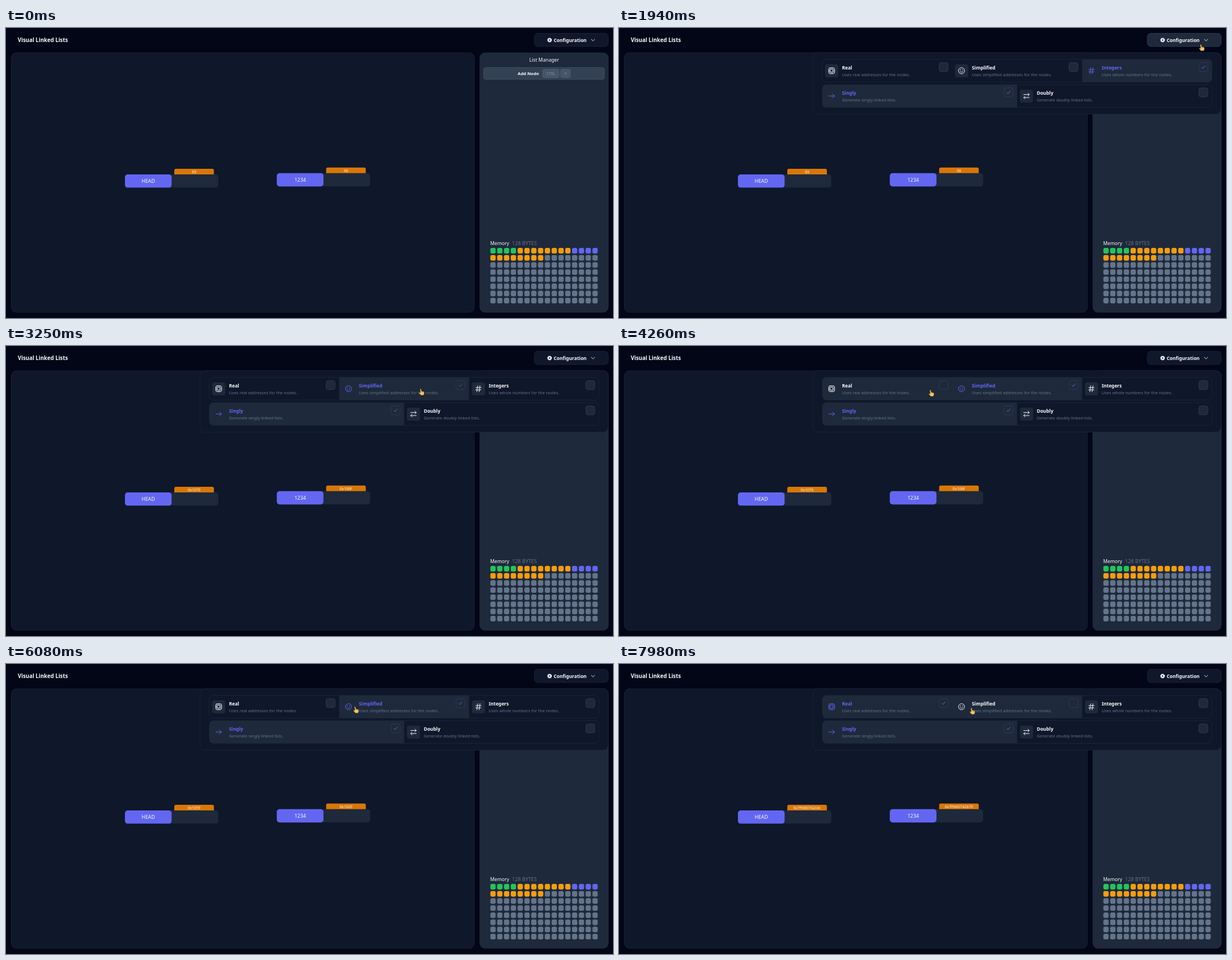
Recreate the animation shown at these times as an HTML page. Size 1082 px wide and 517 px high, loop 8000 ms.

```html
<!DOCTYPE html>
<html lang="en">
<head>
<meta charset="utf-8">
<title>Linked list visualiser</title>
<style>
  html, body { margin: 0; width: 100%; height: 100%; overflow: hidden; background: #020617; }
  svg { display: block; width: 1082px; height: 517px; font-family: "Noto Sans", "Open Sans", sans-serif; }
</style>
</head>
<body>
<svg viewBox="0 0 1082 517"><g id="base"></g><g id="live"></g></svg>
<script>
const LOOP = 8000;
const C = {
  panel: '#0f172a', raised: '#1e293b', line: '#334155', badge: '#475569', muted: '#64748b',
  indigo: '#6366f1', amber: '#f59e0b', tab: '#d97706', green: '#22c55e', white: '#f8fafc'
};

// Drawing helpers
const rect = (x, y, w, h, r, fill, stroke = 'none') =>
  `<rect x="${x}" y="${y}" width="${w}" height="${h}" rx="${r}" fill="${fill}" stroke="${stroke}" stroke-width=".8"/>`;
const text = (s, x, middle, size, fill, weight = 400, anchor = 'start') =>
  `<text x="${x}" y="${middle + size * 0.357}" font-size="${size}" fill="${fill}" font-weight="${weight}" text-anchor="${anchor}">${s}</text>`;
const stroke = (d, color, width = 1) =>
  `<path d="${d}" fill="none" stroke="${color}" stroke-width="${width}" stroke-linecap="round" stroke-linejoin="round"/>`;
const at = (x, y, body, opacity = 1) => `<g transform="translate(${x} ${y})" opacity="${opacity}">${body}</g>`;
const clamp = v => Math.max(0, Math.min(1, v));
const mix = (a, b, k) => '#' + [1, 3, 5].map(i => {
  const [p, q] = [a, b].map(c => parseInt(c.slice(i, i + 2), 16));
  return Math.round(p + (q - p) * k).toString(16).padStart(2, '0');
}).join('');

const icons = {
  chip: c => stroke('M-3.8 -4.8H3.8Q4.8 -4.8 4.8 -3.8V3.8Q4.8 4.8 3.8 4.8H-3.8Q-4.8 4.8 -4.8 3.8V-3.8Q-4.8 -4.8 -3.8 -4.8ZM-2.4 -2.4H2.4V2.4H-2.4Z', c) +
    stroke('M-2 -5.7v.9M0 -5.7v.9M2 -5.7v.9M-2 4.8v.9M0 4.8v.9M2 4.8v.9M-5.7 -2h.9M-5.7 0h.9M-5.7 2h.9M4.8 -2h.9M4.8 0h.9M4.8 2h.9', c, .7),
  smile: c => `<circle r="5.4" fill="none" stroke="${c}"/>` +
    stroke('M-2.6 1.2Q0 4.4 2.6 1.2', c) + stroke('M-1.9 -1.6v.1M1.9 -1.6v.1', c, 1.5),
  hash: c => stroke('M-4.6 -2H5M-5 2H4.6M-1.2 -5.4L-2.8 5.4M2.8 -5.4L1.2 5.4', c),
  arrow: c => stroke('M-5 0H5M1.4 -3.6L5 0L1.4 3.6', c),
  swap: c => stroke('M-5 -2.6H5M2.6 -5L5 -2.6L2.6 -.2M5 2.8H-5M-2.6 .4L-5 2.8L-2.6 5.2', c)
};

// Timeline
const states = [
  { from: 0, mode: 'int', addresses: ['69', '98'] },
  { from: 3060, mode: 'simple', addresses: ['0x1070', '0x106F'] },
  { from: 4430, mode: 'real', addresses: ['0x7ffd60742c14', '0x7ffd60742c04'] },
  { from: 5810, mode: 'simple', addresses: ['0x1059', '0x1020'] },
  { from: 6980, mode: 'real', addresses: ['0x7ffd60742c4c', '0x7ffd60742b70'] }
];
const stateAt = t => states.filter(s => s.from <= Math.max(t, 0)).pop();

// Pointer keys: time, x, y
const route = [
  [590, 1044, 500], [800, 1043, 315], [1000, 1048, 105], [1070, 1049, 77], [1340, 1047, 25],
  [1940, 1039, 35], [2210, 1022, 26], [2630, 741, 82], [3250, 741, 82], [4000, 559, 91],
  [4080, 558, 90], [4260, 557, 84], [5000, 557, 84], [5350, 623, 86], [5610, 642, 79],
  [5810, 642, 79], [6560, 582, 88], [6640, 579, 89], [7490, 579, 89], [7980, 630, 84]
];
function pointerAt(t) {
  if (t < route[0][0]) return { x: -99, y: -99 };
  const i = route.findIndex(k => k[0] > t);
  if (i < 0) return { x: route.at(-1)[1], y: route.at(-1)[2] };
  const [a, b] = [route[i - 1], route[i]];
  const k = (t - a[0]) / (b[0] - a[0]);
  const e = k * k * (3 - 2 * k);
  return { x: a[1] + (b[1] - a[1]) * e, y: a[2] + (b[2] - a[2]) * e };
}
const menuAt = t => clamp((t - 1480) / 200);
const inside = (p, x, y, w, h) => p.x >= x && p.x <= x + w && p.y >= y && p.y <= y + h;
const overConfig = t => inside(pointerAt(t), 941.5, 9.5, 132, 27);
const overAdd = t => !menuAt(t) && inside(pointerAt(t), 851, 70, 216, 22);

// Averages a condition over the preceding span, like a linear transition
function eased(test, t, span = 150) {
  let sum = 0;
  for (let i = 0; i < 10; i++) sum += test(t - span * i / 10) ? 1 : 0;
  return sum / 10;
}

const cards = [
  { id: 'real', x: 362.5, y: 56, w: 231.5, icon: 'chip', title: 'Real', note: 'Uses real addresses for the nodes.' },
  { id: 'simple', x: 594, y: 56, w: 231.5, icon: 'smile', title: 'Simplified', note: 'Uses simplified addresses for the nodes.' },
  { id: 'int', x: 825.5, y: 56, w: 231.5, icon: 'hash', title: 'Integers', note: 'Uses whole numbers for the nodes.' },
  { id: 'singly', x: 362.5, y: 101, w: 347.2, icon: 'arrow', title: 'Singly', note: 'Generate singly linked lists.' },
  { id: 'doubly', x: 709.7, y: 101, w: 347.3, icon: 'swap', title: 'Doubly', note: 'Generate doubly linked lists.' }
];
const selected = (card, t) => card.id === 'singly' || card.id === stateAt(t).mode;
const hovered = (card, t) => menuAt(t) === 1 && inside(pointerAt(t), card.x, card.y, card.w, 40.5);

function drawCard(card, t) {
  const { x, y, w } = card;
  const fill = eased(s => selected(card, s) || hovered(card, s), t);
  const color = mix(C.white, C.indigo, eased(s => selected(card, s), t, 100));
  const check = eased(s => selected(card, s), t, 350);
  return `<rect x="${x}" y="${y}" width="${w}" height="40.5" fill="${C.raised}" opacity="${fill}"/>` +
    rect(x + 5, y + 8.7, 23.4, 23.2, 4, C.raised) +
    at(x + 16.6, y + 20.2, icons[card.icon](color)) +
    text(card.title, x + 35, y + 14.8, 8.4, color, 600) +
    text(card.note, x + 35, y + 27.3, 7.54, C.muted) +
    rect(x + w - 23.4, y + 5.8, 16.2, 16, 4, C.raised, C.line) +
    at(x + w - 15.3, y + 13.8, stroke('M-3 .3L-1 2.4L3 -2.4', C.indigo), selected(card, t) ? check : 0);
}

function drawMenu(t) {
  const open = menuAt(t);
  if (!open) return '';
  const frames = [56, 101].map(y => rect(362.5, y, 694.5, 40.5, 7, 'none', C.raised)).join('');
  return at(0, 5 * (1 - open), rect(346, 44, 727.5, 109.5, 9, C.panel, C.raised) +
    `<g clip-path="url(#rows)">${cards.map(c => drawCard(c, t)).join('')}</g>` + frames, open);
}

function drawConfig(t) {
  const k = eased(overConfig, t);
  return rect(941.8, 9.5, 131.7, 23.5, 6, mix(C.panel, C.raised, k), mix(C.raised, C.line, k)) +
    at(969, 21.5, `<circle r="2.3" fill="none" stroke="${C.white}" stroke-width="1.9"/>` +
      `<circle r="3.5" fill="none" stroke="${C.white}" stroke-width="1.3" stroke-dasharray="1.6 1.15"/>`) +
    text('Configuration', 976.2, 21.5, 8.46, C.white, 600) +
    stroke('M1043.4 20.2L1046.4 23L1049.4 20.2', C.white, .9);
}

function drawAdd(t) {
  const k = eased(overAdd, t, 100);
  const badge = mix(C.badge, '#425066', k);
  const key = (s, x, w) => rect(x, 73.5, w, 15, 3, badge, mix('#526075', '#48566b', k)) +
    text(s, x + w / 2, 81.7, 6.8, '#8190a6', 500, 'middle');
  return rect(851.4, 70.4, 215.4, 21.2, 4, mix(C.line, '#3f4c5e', k), C.badge) +
    text('Add Node', 912, 81.5, 7.8, C.white, 600) + key('CTRL', 956.7, 29.3) + key('Y', 988.7, 17.3);
}

function drawPointer(t) {
  const p = pointerAt(t);
  const hand = overConfig(t) || overAdd(t) || cards.some(c => hovered(c, t));
  const shape = hand
    ? '<path d="M-3 -5Q-2.1 -6.7 -1 -5L-.4 -1.4L3.4 -.8Q4.9 0 4.6 2L3.6 5.7H-1.6L-4.9 1.5Q-4.6 0 -2.2 1.3Z" fill="#fcc56c" stroke="#4a2f12" stroke-width=".6"/>' +
      stroke('M1 -.8v2M2.8 -.6v2', '#b9762b', .5)
    : '<path d="M-3 -6V4.6L-.6 2.4L1 5.8L2.6 5L1 1.8H4.4Z" fill="#fff" stroke="#111827" stroke-width=".6"/>';
  return at(p.x, p.y, shape);
}

function drawNode(x, y, label) {
  return rect(x, y, 166.5, 23.6, 5, C.raised) + rect(x, y, 83.2, 23.6, 5, C.indigo) +
    text(label, x + 41.7, y + 12.1, 8.9, C.white, 400, 'middle') +
    `<path d="M${x + 88} ${y}v-7q0 -3 3 -3h64.6q3 0 3 3v7z" fill="${C.tab}"/>`;
}

function cellColor(i) {
  if (i < 4) return C.green;
  if (i >= 12 && i < 16) return C.indigo;
  return i < 24 ? C.amber : C.muted;
}
const cells = Array.from({ length: 128 }, (_, i) =>
  rect(863.4 + i % 16 * 12.13, 392.1 + Math.floor(i / 16) * 12.7, 9.4, 9.9, 3, cellColor(i))).join('');

const nodes = [{ x: 212, y: 261, label: 'HEAD' }, { x: 482.7, y: 258.8, label: '1234' }];

document.getElementById('base').innerHTML =
  `<clipPath id="rows">${[56, 101].map(y => rect(362.5, y, 694.5, 40.5, 7, '#fff')).join('')}</clipPath>` +
  text('Visual Linked Lists', 21, 21.6, 9.7, C.white, 700) +
  rect(9.5, 44.3, 825.3, 462.5, 9, C.panel, C.raised) +
  rect(844.7, 44.3, 228.8, 462.5, 9, C.raised, '#273449') +
  text('List Manager', 959.3, 57.3, 8.66, C.white, 400, 'middle') +
  text('Memory', 863, 383.6, 8.64, C.white) + text('128 BYTES', 902, 383.6, 9.1, C.muted) +
  cells + nodes.map(n => drawNode(n.x, n.y, n.label)).join('');

const live = document.getElementById('live');
const start = performance.now();
function frame() {
  const t = (performance.now() - start) % LOOP;
  const { addresses } = stateAt(t);
  live.innerHTML =
    nodes.map((n, i) => text(addresses[i], n.x + 123.2, n.y - 4.1, 6.64, C.white, 400, 'middle')).join('') +
    drawAdd(t) + drawConfig(t) + drawMenu(t) + drawPointer(t);
  requestAnimationFrame(frame);
}
frame();
</script>
</body>
</html>
```
